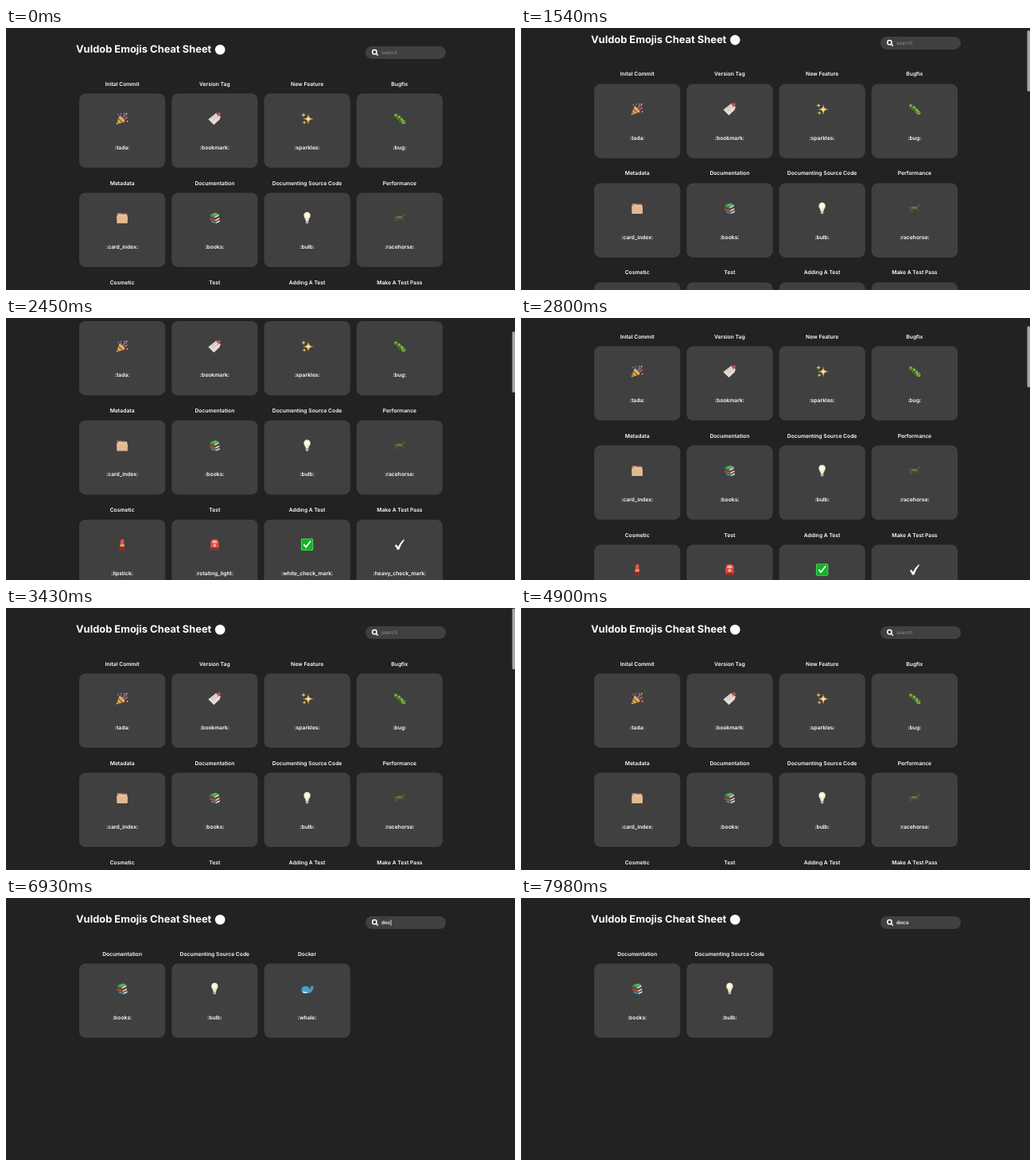
Write an HTML page with a canvas that moves like this. It is 640x330 px and loops after 8 s.

```html
<!DOCTYPE html>
<html lang="en">
<head>
<meta charset="utf-8">
<title>Emojis Cheat Sheet</title>
<style>
  html, body { margin: 0; width: 100%; height: 100%; overflow: hidden; background: #222; }
  canvas { display: block; }
</style>
</head>
<body>
<canvas id="stage" width="640" height="330"></canvas>
<script>
const ctx = document.getElementById('stage').getContext('2d');
const LOOP = 8000;
const FONT = 'Inter, "Open Sans", sans-serif';

const ITEMS = [
  ['Inital Commit', 'tada'], ['Version Tag', 'bookmark'],
  ['New Feature', 'sparkles'], ['Bugfix', 'bug'],
  ['Metadata', 'card_index'], ['Documentation', 'books'],
  ['Documenting Source Code', 'bulb'], ['Performance', 'racehorse'],
  ['Cosmetic', 'lipstick'], ['Test', 'rotating_light'],
  ['Adding A Test', 'white_check_mark'], ['Make A Test Pass', 'heavy_check_mark'],
  ['General Update', 'zap'], ['Refactor Code', 'hammer'],
  ['Removing Code/Files', 'fire'], ['Upgrading Dependencies', 'arrow_up'],
  ['Downgrading Dependencies', 'arrow_down'], ['Deploying Stuffs', 'rocket'],
  ['Fixing On Feldoma', 'checkered_flag'], ['Adding CI Build System', 'construction_worker'],
  ['Docker', 'whale'],
];

// Path helpers, in pixels around the icon centre
const dot = (x, y, r) => `M${x - r} ${y}a${r} ${r} 0 1 0 ${2 * r} 0a${r} ${r} 0 1 0 ${-2 * r} 0Z`;
const star = (x, y, r) =>
  `M${x} ${y - r}Q${x} ${y} ${x + r} ${y}Q${x} ${y} ${x} ${y + r}Q${x} ${y} ${x - r} ${y}Q${x} ${y} ${x} ${y - r}Z`;
const tile = r => `M${2 - r} ${-r}H${r - 2}Q${r} ${-r} ${r} ${2 - r}V${r - 2}Q${r} ${r} ${r - 2} ${r}`
  + `H${2 - r}Q${-r} ${r} ${-r} ${r - 2}V${2 - r}Q${-r} ${-r} ${2 - r} ${-r}Z`;

// Each icon is a stack of [colour, filled path]
const ICONS = {
  tada: [
    ['#e5b35a', 'M-7.5 7.5L-3.5-3.5Q2-1 3.5 4Z'],
    ['#a8643a', 'M-5.8 3L-3.5 6L-5 6.6L-6.5 5ZM-4.3-1L1 4.5L-1 5.3L-5 1Z'],
    ['#8d70c0', 'M0-2Q3-3 1.5-7L3-7Q5-3 1-.5Z' + dot(-5, -5, 1)],
    ['#d8564b', 'M2 1Q3-2 7-2V-.5Q4 0 3 2Z' + dot(-1.5, -6, .9)],
    ['#e4c94c', dot(5.5, -6, 1) + dot(6.5, 3.5, .9)],
    ['#62a3cc', dot(-2, -3.5, .8) + dot(5, -3.5, .8)],
  ],
  bookmark: [
    ['#e5dfd9', 'M-8 1L2-7L7.5-2.5L6 1.5L-1 8Z'],
    ['#b7aea8', 'M-5 .5L1-4.5L1.6-4L-4.4 1ZM-3 2.5L3-2.5L3.6-2L-2.4 3Z'],
    ['#c95050', 'M1.5-5.5L6-8L8-6L4-1.5L4-4Z'],
  ],
  sparkles: [
    ['#e8bd5b', star(1.5, .5, 7) + star(-4.5, -4.5, 3.5) + star(-3.5, 5, 3)],
    ['#f9e7a6', star(1.5, .5, 3.5)],
  ],
  bug: [
    ['#47702c', dot(-4.5, -3.5, 2.7) + dot(-1, -1, 3.2) + dot(2, 2, 3.2)],
    ['#94b547', dot(-4.8, -4.5, 1.5) + dot(-.5, -2, 1.5) + dot(2.6, 1, 1.5) + dot(5, 4.5, 2.5)],
    ['#2b321d', dot(4.7, 5, .7) + dot(6, 3.8, .7) + 'M-6 0L-5.4 3L-4.6 0ZM-2 2L-1.5 5.5L-.8 2Z'],
  ],
  card_index: [
    ['#a87a57', 'M-6.5-6H-1L0-4.5H6.5V0H-6.5Z'],
    ['#e0c6aa', 'M-5.5-4.5H6V-1H-5.5Z'],
    ['#c76d5b', 'M0-5.5H5V-4H0Z'],
    ['#e2ba91', 'M-7-2.5H-2L-1-1.5H7L6.7 7H-6.7Z'],
  ],
  books: [
    ['#4d7f9c', 'M-4.5 3.5L2 5L6.5 3V5.3L2 7.5L-4.5 5.5Z'],
    ['#b9473d', 'M-6.5 0L1 2L6-.5V2L1 4.5L-6.5 2.3Z'],
    ['#e8dfcf', 'M1 2.4L6 0V1.6L1 4ZM2 5.3L6.5 3.3V4.8L2 6.9Z'],
    ['#3d8248', 'M-6-4L1-6.5L5.5-4.5L5-2L0 .8L-6-1.5Z'],
    ['#ddd7c7', 'M0-1.5L5.3-4.2V-2.3L0 .3Z'],
    ['#62ab68', 'M-5-4L1-6.2L5-4.5L0-2.2Z'],
  ],
  bulb: [
    ['#f2e9c8', 'M-1.8 4Q-1.8 2-3.2.3Q-4.3-1-4.2-3A4.2 4.2 0 0 1 4.2-3Q4.3-1 3.2.3Q1.8 2 1.8 4Z'],
    ['#fffbea', dot(-.3, -3, 2.6)],
    ['#b5b5b0', 'M-1.8 4H1.8V6.5L1 7.3H-1L-1.8 6.5Z'],
  ],
  racehorse: [
    ['#455e3c', 'M-7-1Q-6-3-4-2L2-2L5-5L7.5-3.5L7-2.5L5.5-2.5L4 1L6 4H4.8L2.5 1.7L-2 1.5L-3 5H-4.2L-4 2L-6 4.5L-7 4L-5 .5L-6-.5L-7.5 2Z'],
    ['#8d6946', 'M-3-2L2-2L3 .5L-3 .5Z'],
  ],
  lipstick: [
    ['#df5348', 'M-2.2 0V-5Q0-8 2.2-6.5V0Z'],
    ['#d7a853', 'M-2.7-.5H2.7V3H-2.7Z'],
    ['#8f2934', 'M-3.5 2.5H3.5V7.5H-3.5Z'],
  ],
  rotating_light: [
    ['#df4b3f', 'M-5.5 4L-5-4Q-4.5-7 0-7T5-4L5.5 4Z'],
    ['#f2b0a3', 'M-3.5-3Q-3-5.5 0-5.5T3.5-3L2.5-2H-2.5Z' + dot(0, 1, 2)],
    ['#8b3533', 'M-6 4H6V7H-6Z'],
  ],
  white_check_mark: [
    ['#58d765', tile(7.7)],
    ['#10b522', tile(6.8)],
    ['#fff', 'M-5 .5L-3.5-.8L-1.5 1.7L3.7-5L5-4L-1.3 4.5Z'],
  ],
  heavy_check_mark: [
    ['#fff', 'M-6 1.5L-4.5-.2Q-2.8 1-2 2.8Q1-3 5-6.5L6.2-6Q1.5 0-.5 6.3H-3Q-4 3-6 1.5Z'],
  ],
  zap: [['#f6b93b', 'M4-7L-6 1.2L-.5 .8L-4.2 7L6-1.8L.7-1.2Z']],
  hammer: [
    ['#29211f', 'M-3-2.5L-2-3.6L7 6L6 7Z'],
    ['#a3a5a6', 'M-7-1L-5.5-3.8L-2-6.2L2-6.5L-1-4.5L-1.5-3L-3.2-1.8L-4.3-2.6L-6 0Z'],
  ],
  fire: [
    ['#e9662e', 'M-1-7.5Q4-4 3.5-1Q5-2 4.8-3.5Q6.7 0 5.6 3.5Q4 7.3 0 7.3T-5.6 3.5Q-6.7-.5-4-3Q-4-1-3-.5Q-1-4-1-7.5Z'],
    ['#fbc95a', 'M0-.5Q3.5 2 3 5Q2 7.3 0 7.3T-3 5Q-3 3-1.5 2Q0 1 0-.5Z'],
  ],
  arrow_up: [
    ['#bdd1e0', tile(7.7)],
    ['#86a9c8', tile(6.8)],
    ['#fff', 'M0-5.5L5 0H2V5H-2V0H-5Z'],
  ],
  arrow_down: [
    ['#bdd1e0', tile(7.7)],
    ['#86a9c8', tile(6.8)],
    ['#fff', 'M0 5.5L5 0H2V-5H-2V0H-5Z'],
  ],
  checkered_flag: [
    ['#8d765f', 'M-7-7H-6V8H-7Z'],
    ['#eee', 'M-6-6H6V3H-6Z'],
    ['#333', 'M-6-6h3v3h3v-3h3v3h3v3h-3v3h-3v-3h-3v3h-3v-3h3v-3h-3ZM0-3v3h3v-3Z'],
  ],
  whale: [
    ['#519cc6', 'M-7 2Q-7-3-2-3Q2-3 4 1Q5 0 4-4L6-2.5L8-4Q8 5 2 6H-3Q-7 6-7 2Z'],
    ['#d4e7ee', 'M-6 4Q-2 3 1 6H-3Q-5 6-6 4Z'],
  ],
};
for (const layers of Object.values(ICONS))
  for (const layer of layers) layer[1] = new Path2D(layer[1]);

const SCROLL = [[1330, 0], [1540, 12], [2100, 69.5], [2380, 82], [2800, 47], [3380, 0]];
const TYPING = [[6160, 'd'], [6580, 'do'], [6930, 'doc'], [7280, 'docu']];
const FOCUS = 5200;

// Smooth curve through the scroll points, at rest at both ends
function scrollAt(t) {
  const last = SCROLL.length - 1;
  if (t <= SCROLL[0][0] || t >= SCROLL[last][0]) return 0;
  const slope = i => i === 0 || i === last ? 0 :
    (SCROLL[i + 1][1] - SCROLL[i - 1][1]) / (SCROLL[i + 1][0] - SCROLL[i - 1][0]);
  const i = SCROLL.findIndex(p => p[0] > t) - 1;
  const [t0, a] = SCROLL[i], [t1, b] = SCROLL[i + 1];
  const d = t1 - t0, u = (t - t0) / d, v = 1 - u;
  return Math.max(0, v * v * (1 + 2 * u) * a + u * u * (1 + 2 * v) * b
    + d * u * v * (v * slope(i) - u * slope(i + 1)));
}

function text(str, x, y, size, weight, align = 'left', color = '#fff') {
  ctx.font = `${weight} ${size}px ${FONT}`;
  ctx.textAlign = align;
  ctx.fillStyle = color;
  ctx.fillText(str, x, y);
}

function box(x, y, w, h, r, color) {
  ctx.fillStyle = color;
  ctx.beginPath();
  ctx.roundRect(x, y, w, h, r);
  ctx.fill();
}

function drawIcon(name, x, y) {
  ctx.save();
  ctx.translate(x, y);
  for (const [color, path] of ICONS[name] || []) {
    ctx.fillStyle = color;
    ctx.fill(path);
  }
  ctx.restore();
}

function drawHeader(t, query, typedAt) {
  text('Vuldob Emojis Cheat Sheet', 88, 31.4, 12.9, 700);
  ctx.beginPath();
  ctx.arc(269.2, 27.2, 6.3, 0, 7);
  ctx.fill();

  box(452, 23, 101, 16, 8, '#404040');
  ctx.strokeStyle = '#fff';
  ctx.lineWidth = 1.5;
  ctx.beginPath();
  ctx.arc(463.4, 30.3, 2.7, 0, 7);
  ctx.moveTo(465.4, 32.3);
  ctx.lineTo(467.8, 34.7);
  ctx.stroke();

  if (query) text(query, 472, 33.3, 6.3, 600);
  else text('search', 472, 33.3, 6.3, 400, 'left', '#8f8f8f');
  if (t >= FOCUS && (t - typedAt) % 1000 < 500) {
    ctx.fillStyle = '#fff';
    ctx.fillRect(472.2 + ctx.measureText(query).width, 27.5, .8, 7.5);
  }
}

function drawCard([label, icon], i) {
  const x = 92 + (i % 4) * 116.25, y = 82.5 + Math.floor(i / 4) * 125;
  const mid = x + 54.1;
  text(label, mid, y - 10, 6.75, 600, 'center');
  box(x, y, 108.3, 93.5, 8, '#404040');
  drawIcon(icon, mid, y + 31.5);
  text(`:${icon}:`, mid, y + 70.5, 6.75, 600, 'center');
}

function draw(t) {
  const [typedAt, query] = TYPING.findLast(k => t >= k[0]) || [FOCUS, ''];
  const scroll = scrollAt(t);
  ctx.fillStyle = '#222';
  ctx.fillRect(0, 0, 640, 330);
  ctx.fillStyle = '#2c2c2c';
  ctx.fillRect(0, 0, 1, 330);
  ctx.textRendering = 'geometricPrecision';

  ctx.save();
  ctx.translate(0, -scroll);
  drawHeader(t, query, typedAt);
  ITEMS.filter(([label]) => label.toLowerCase().includes(query)).forEach(drawCard);
  ctx.restore();

  if (t >= SCROLL[0][0] && t < 4130) {
    ctx.globalAlpha = Math.min(1, (4130 - t) / 250);
    box(636.5, .5 + scroll * .21, 3.5, 77, 1.7, '#a6a6a6');
    ctx.globalAlpha = 1;
  }
}

function frame() {
  draw(performance.now() % LOOP);
  requestAnimationFrame(frame);
}
frame();
</script>
</body>
</html>
```
